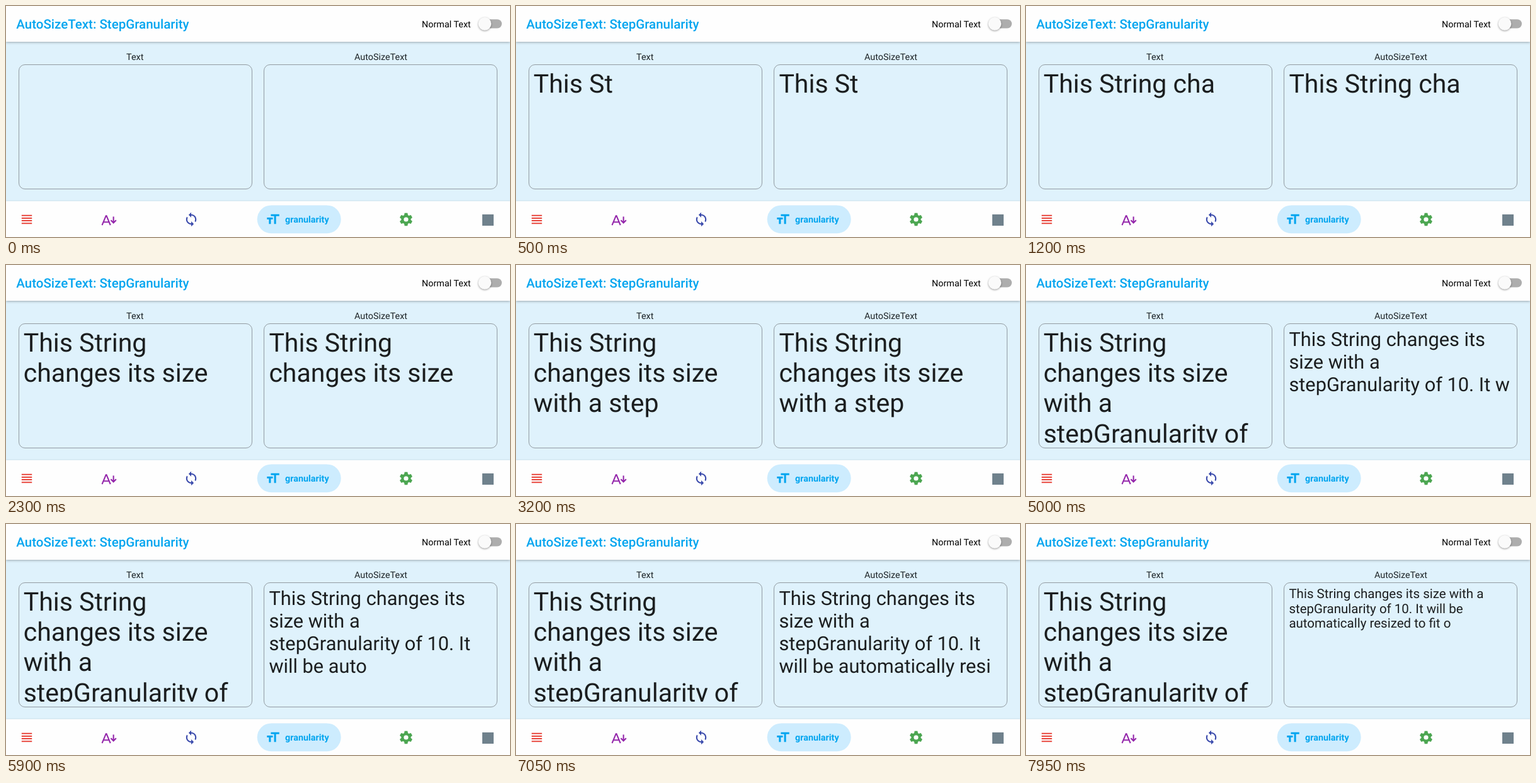
Recreate the animation shown at these times as an HTML page. Size 800x368 px, loop 8000 ms.

```html
<!DOCTYPE html>
<html lang="en">
<head>
<meta charset="utf-8">
<title>AutoSizeText: StepGranularity</title>
<style>
  html, body { margin: 0; width: 100%; height: 100%; overflow: hidden; }
  body {
    position: relative; background: #dff2fc;
    font-family: Roboto, sans-serif; text-rendering: geometricPrecision;
  }
  svg { position: absolute; left: 0; top: 0; }
  .bar { position: absolute; left: 0; right: 0; background: #fefefe; }
  #top { top: 0; height: 57px; box-shadow: 0 1px 4px rgba(0, 0, 0, .32); }
  #nav { top: 311px; bottom: 0; box-shadow: 0 0 3px rgba(0, 0, 0, .12); }
  .panel {
    position: absolute; top: 93px; width: 371px; height: 198.5px; box-sizing: border-box;
    border: 1.5px solid #929ba1; border-radius: 10px;
  }
  .view {
    position: absolute; top: 101px; width: 354.6px; height: 182.3px;
    overflow: hidden; color: rgba(0, 0, 0, .88);
  }
</style>
</head>
<body>
<div id="top" class="bar"></div>
<div id="nav" class="bar"></div>
<div class="panel" style="left:19.7px"></div>
<div class="panel" style="left:409.3px"></div>

<svg width="800" height="368" font-size="14.36">
  <text x="16.3" y="36" font-size="20.51" font-weight="500" fill="#03a5ef">AutoSizeText: StepGranularity</text>
  <text x="660" y="33.5">Normal Text</text>
  <g fill="#1c2326" text-anchor="middle">
    <text x="204.7" y="85.5">Text</text>
    <text x="595" y="85.5">AutoSizeText</text>
  </g>

  <!-- switch -->
  <rect x="753" y="21.2" width="34" height="14.4" rx="7.2" fill="#adadad"/>
  <circle cx="760" cy="28.4" r="10.3" fill="#fafafa" style="filter:drop-shadow(0 1px 1.5px rgba(0,0,0,.4))"/>

  <!-- navigation -->
  <rect x="398.7" y="317.4" width="133" height="44.8" rx="22.4" fill="#cdecfe"/>
  <text x="443" y="344.8" font-weight="700" fill="#03a5ef">granularity</text>
  <g transform="translate(33 340) scale(1.0256) translate(-12 -12)" fill="#e8453c">
    <path d="M4 5h16v2H4zM4 9h16v2H4zM4 13h16v2H4zM4 17h16v2H4z"/>
  </g>
  <g fill="none" stroke="#9426ab" stroke-width="2.1">
    <path d="M152.5 349.2L158.7 334.2H159.5L165.7 349.2M155 344.3H163.2"/>
    <path d="M170.6 335.5V345M166.4 341.2L170.6 345.4L174.8 341.2"/>
  </g>
  <g transform="translate(294 340) scale(1.0256) translate(-12 -12)" fill="#3949ab">
    <path id="arc" d="M12 4V1L8 5l4 4V6c3.31 0 6 2.69 6 6 0 1.01-.25 1.97-.7 2.8l1.46 1.46C19.54 15.03 20 13.57 20 12c0-4.42-3.58-8-8-8z"/>
    <use href="#arc" transform="rotate(180 12 12)"/>
  </g>
  <g transform="translate(423.5 340) scale(1.0256) translate(-12 -12)" fill="#03a5ef">
    <path d="M9 4v3h5v12h3V7h5V4zM3 12h3v7h3v-7h3V9H3z"/>
  </g>
  <g transform="translate(635 340)" stroke="#4ca651" fill="none">
    <circle r="5.6" stroke-width="4"/>
    <g id="teeth" fill="#4ca651" stroke="none"></g>
  </g>
  <rect x="756" y="332" width="18" height="18" fill="#6f818c"/>
</svg>

<div class="view" style="left:27.7px"><div id="plain"></div></div>
<div class="view" style="left:417.4px"><div id="auto"></div></div>

<script>
const MESSAGE = 'This String changes its size with a stepGranularity of 10. ' +
  'It will be automatically resized to fit on the UI.';
const LOOP = 8000, FRAME = 50, CHAR_TIME = 80;
const UNIT = 800 / 780;      // stage pixels per layout unit
const MAX_HEIGHT = 178;
const plain = document.getElementById('plain');
const auto = document.getElementById('auto');

for (let angle = 0; angle < 360; angle += 60) {
  document.getElementById('teeth').innerHTML +=
    `<path d="M-3.4 -5L-2.3 -10.2H2.3L3.4 -5Z" transform="rotate(${angle})"/>`;
}

function setSize(element, size) {
  element.style.fontSize = size * UNIT + 'px';
  element.style.lineHeight = Math.round(size * 1.172) * UNIT + 'px';
}

function fit(element) {
  for (let size = 40; size >= 10; size -= 10) {
    setSize(element, size);
    if (element.offsetHeight <= MAX_HEIGHT) return;
  }
}

let shown = -1;
function draw(now) {
  const time = Math.floor(now % LOOP / FRAME) * FRAME;
  const count = Math.floor(time / CHAR_TIME + 0.8);
  if (count !== shown) {
    shown = count;
    plain.textContent = auto.textContent = MESSAGE.slice(0, count);
    fit(auto);
  }
  requestAnimationFrame(() => draw(performance.now() - start));
}

setSize(plain, 40);
const start = performance.now();
draw(0);
</script>
</body>
</html>
```
